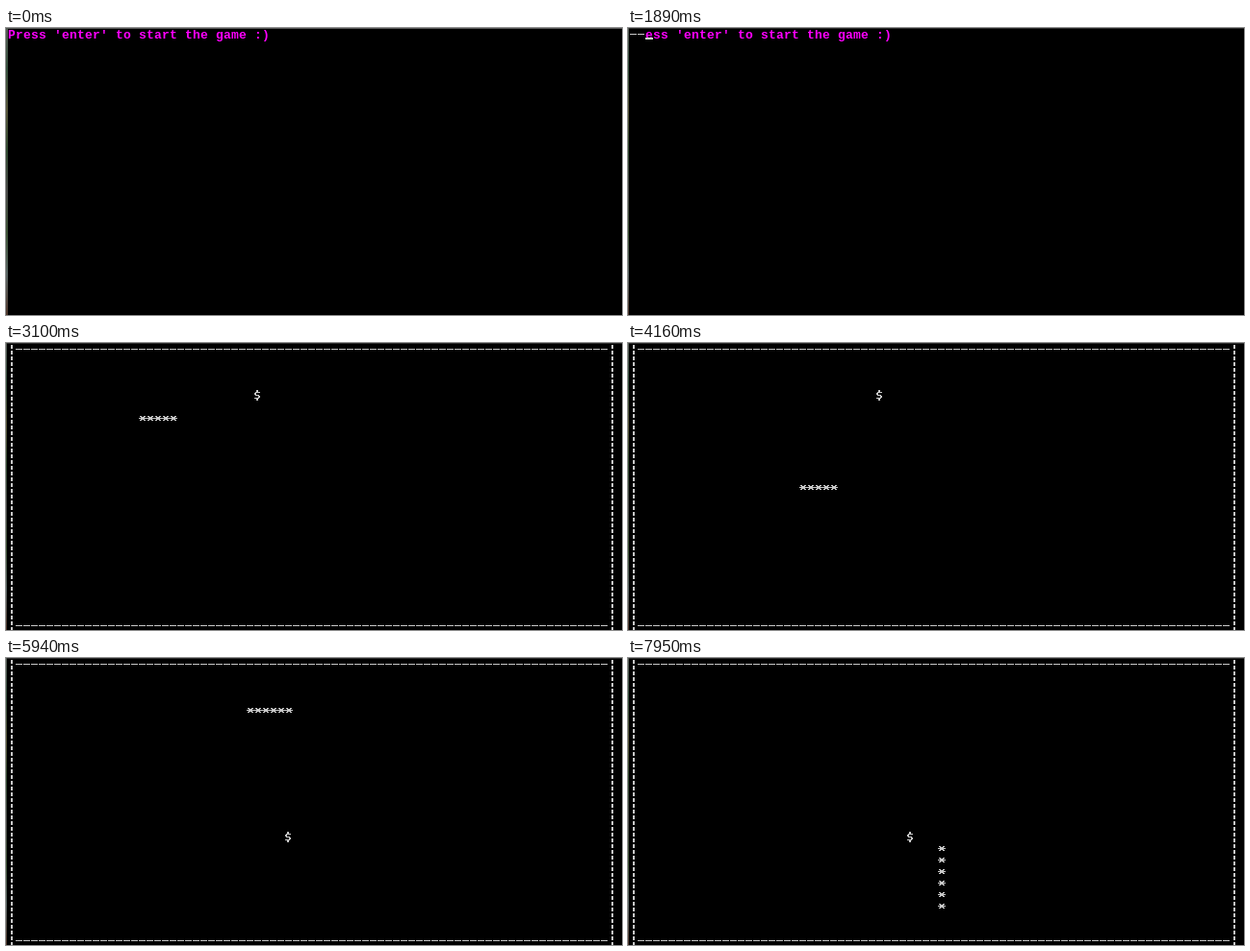
An HTML page with a canvas that plays this animation: 640x299 px, repeating every 8 s.

```html
<!DOCTYPE html>
<html>
<head>
<meta charset="utf-8">
<style>
html, body { margin: 0; background: #000; overflow: hidden; }
canvas { display: block; }
</style>
</head>
<body>
<canvas id="stage" width="640" height="299"></canvas>
<script>
const ctx = document.getElementById('stage').getContext('2d');
const LOOP = 8000, CELL_W = 8, CELL_H = 12, LEFT = 2;
const RIGHT_COL = 78, BOTTOM_ROW = 24;
const PROMPT = "Press 'enter' to start the game :)";

// Console glyphs: first pixel row in the cell, then one byte per row
const GLYPHS = {
  '*': [4, 0x66, 0x3c, 0xff, 0x3c, 0x66],
  '$': [1, 0x30, 0x30, 0x7c, 0xc0, 0xc0, 0x78, 0x0c, 0x0c, 0xf8, 0x30, 0x30],
  '-': [6, 0xfe],
  '|': [2, 0x18, 0x18, 0x18, 0x18, 0, 0, 0x18, 0x18, 0x18, 0x18]
};

function rect(color, x, y, w, h) {
  ctx.fillStyle = color;
  ctx.fillRect(x, y, w, h);
}

function put(glyph, col, row) {
  const x = LEFT + col * CELL_W, y = row * CELL_H;
  rect('#000', x, y + 1, CELL_W, CELL_H - 1);
  const [top, ...bits] = GLYPHS[glyph];
  bits.forEach((byte, line) => {
    for (let i = 0; i < 8; i++) {
      if (byte & (128 >> i)) rect('#c8c8c8', x + i, y + top + line, 1, 1);
    }
  });
}

function cursor(col, row) {
  rect('#c4dcc4', LEFT + col * CELL_W, row * CELL_H + 10, CELL_W, 2);
}

// Border cells in printing order: top, bottom, left, right
const border = [];
for (const row of [0, BOTTOM_ROW])
  for (let col = 0; col < RIGHT_COL; col++) border.push(['-', col, row]);
for (const col of [0, RIGHT_COL])
  for (let row = 0; row <= BOTTOM_ROW; row++) border.push(['|', col, row]);

// Every cell the snake's head visits
const path = [];
let headCol = 11, headRow = 6;
for (const [dx, dy, count] of [[1, 0, 10], [0, 1, 6], [1, 0, 10], [0, -1, 8], [1, 0, 9], [0, 1, 17]])
  for (let i = 0; i < count; i++) path.push([headCol += dx, headRow += dy]);

// Bursts of evenly spaced moves: first time, last time, count
const moveTimes = [
  [2750, 3100, 5], [3190, 3480, 4], [3610, 4160, 7], [4280, 4340, 2], [4430, 5220, 9],
  [5330, 5780, 6], [5940, 6730, 9], [6780, 7570, 9], [7650, 7950, 4]
].flatMap(([from, to, n]) => Array.from({ length: n }, (_, i) => from + (to - from) * i / (n - 1)));
const EAT_MOVE = 30;

function printedCount(t) {
  if (t < 1830) return 0;
  if (t < 1890) return 1;
  if (t < 1940) return 2;
  const step = Math.min(8, Math.floor((t - 1940) / 98.5) + 1);
  return Math.round(2 + (border.length - 2) * step / 8);
}

function drawWindowEdge(t) {
  const fade = Math.min(1, Math.max(0, Math.ceil((t - 549) / 60) / 5));
  const grey = Math.round(85 - 43 * fade);
  rect(`rgb(${grey},${grey},${grey})`, 0, 0, 640, 1);
  const edge = ctx.createLinearGradient(0, 0, 0, 299);
  ['#555d55', '#34503c', '#58563a', '#304a30', '#4a4a48', '#3c5234', '#5a6664', '#50382c']
    .forEach((color, i) => edge.addColorStop(i / 7, color));
  rect(edge, 0, 0, fade < 1 ? 2 : 1, 299);
}

function drawPrompt() {
  ctx.font = 'bold 13px "Liberation Mono", monospace';
  ctx.fillStyle = '#f0f';
  [...PROMPT].forEach((char, i) => ctx.fillText(char, LEFT + i * CELL_W, 11));
}

function drawGame(t) {
  const moves = moveTimes.filter(time => time <= t).length;
  const eaten = moves >= EAT_MOVE;
  const end = moves + 5;
  path.slice(end - (eaten ? 6 : 5), end).forEach(([col, row]) => put('*', col, row));
  if (eaten) put('$', 36, 15);
  else put('$', 32, 4);
}

function draw(t) {
  rect('#000', 0, 0, 640, 299);
  drawWindowEdge(t);
  const printed = printedCount(t);
  if (printed < RIGHT_COL) drawPrompt();
  border.slice(0, printed).forEach(cell => put(...cell));
  if (printed === border.length) {
    drawGame(t);
  } else if (printed) {
    const [, col, row] = border[printed - 1];
    cursor(col + 1, row);
  } else if (t >= 550 && t < 1030) {
    cursor(0, 1);
  }
}

const start = performance.now();
function tick() {
  draw((performance.now() - start) % LOOP);
  requestAnimationFrame(tick);
}
tick();
</script>
</body>
</html>
```
